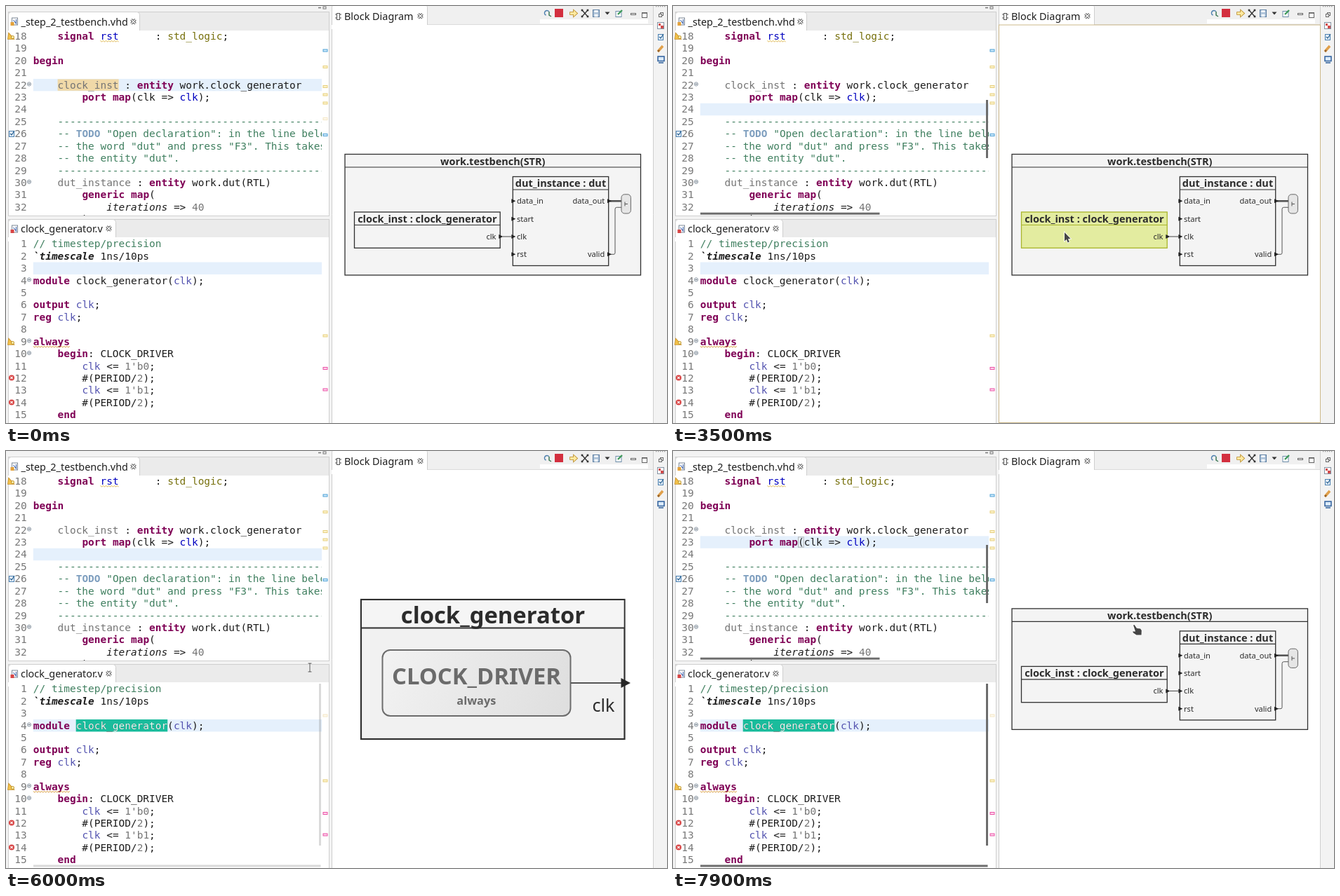
An HTML page with a canvas for the animation above (8000 ms loop, 942 px wide and 595 px high).

```html
<!DOCTYPE html>
<html lang="en">
<head>
<meta charset="utf-8">
<title>Block diagram navigation</title>
<style>
html, body { margin: 0; width: 100%; height: 100%; overflow: hidden; background: #f3f3f3; }
canvas { display: block; }
</style>
</head>
<body>
<canvas id="stage" width="942" height="595"></canvas>
<script>
const g = document.getElementById('stage').getContext('2d');
const LOOP = 8000, STEP = 100;
const MONO = '14.45px "DejaVu Sans Mono", monospace';
const SANS = '"Noto Sans", sans-serif';
const CH = 8.7, ROW = 17.43, LEFT = 38.8;
const TEAL = '#1abc9c', INK = '#2c2c2c';

// {k..} keyword, {c..} comment, {t..} task tag, {g..} muted, {b..} name, {o..} type, {i..} italic, {m..} macro
const STYLES = {
  k: ['#7f0055', 'bold '], c: ['#3f7f5f', ''], t: ['#7f9fbf', 'bold '], g: ['#747474', ''],
  b: ['#0000c0', ''], v: ['#5454b0', ''], o: ['#77700c', ''], i: ['#1c1c1c', 'italic '], m: ['#1c1c1c', 'italic bold ']
};
const RULE = '    {c' + '-'.repeat(52) + '}';
const top1 = {
  first: 18, y: 34.2, clip: [4, 35, 446, 264], folds: [22, 30],
  lines: [
    '    {ksignal} {brst}      : {ostd_logic};', '', '{kbegin}', '',
    '    {gclock_inst} : {kentity} work.clock_generator',
    '        {kport} {kmap}(clk => {bclk});', '',
    RULE,
    '    {c-- }{tTODO}{c "Open declaration": in the line below, click}',
    '    {c-- the word "dut" and press "F3". This takes you to}',
    '    {c-- the entity "dut".}',
    RULE,
    '    {gdut_instance} : {kentity} work.dut(RTL)',
    '        {kgeneric} {kmap}(',
    '            {iiterations} => {g40}',
    '        )'
  ]
};
const low = {
  first: 1, y: 330.7, clip: [4, 330, 446, 265], folds: [4, 9, 10],
  lines: [
    '{c// timestep/precision}', '{m`timescale} 1ns/10ps', '',
    '{kmodule} clock_generator({vclk});', '',
    '{koutput} {vclk};', '{kreg} {vclk};', '',
    '{kalways}', '    {kbegin}: CLOCK_DRIVER',
    '        {vclk} <= {g1\'b0};', '        #(PERIOD/{g2});',
    '        {vclk} <= {g1\'b1};', '        #(PERIOD/{g2});', '    {kend}'
  ]
};

// time, x, y of the pointer
const path = [
  [300, 6, 235], [1100, 292, 126], [1300, 288, 129], [1500, 288, 129], [1600, 284, 130],
  [2200, 110, 113], [2300, 110, 113], [2500, 159, 125], [2900, 159, 125], [3000, 240, 148],
  [3200, 558, 323], [4200, 558, 323], [4500, 588, 333], [5000, 631, 335], [5500, 631, 335],
  [5900, 452, 330], [6800, 281, 141], [7000, 278, 127], [7600, 278, 127], [7900, 656, 248]
];

const clamp = v => Math.max(0, Math.min(1, v));
const ramp = (t, a, b) => clamp((t - a) / (b - a));
const mix = (a, b, p) => a + (b - a) * p;
const col = c => LEFT + c * CH;
const rowY = (ed, n) => ed.y + (n - ed.first) * ROW;

function pointer(t) {
  for (let i = 1; i < path.length; i++) {
    const a = path[i - 1], b = path[i];
    if (t <= b[0]) {
      const p = ramp(t, a[0], b[0]);
      return [mix(a[1], b[1], p), mix(a[2], b[2], p)];
    }
  }
  return path[path.length - 1].slice(1);
}

function rect(x, y, w, h, fill, stroke, lw = 1) {
  if (fill) { g.fillStyle = fill; g.fillRect(x, y, w, h); }
  if (stroke) { g.strokeStyle = stroke; g.lineWidth = lw; g.strokeRect(x, y, w, h); }
}
function rounded(x, y, w, h, r, fill, stroke, lw) {
  g.beginPath(); g.roundRect(x, y, w, h, r);
  g.fillStyle = fill; g.fill();
  g.strokeStyle = stroke; g.lineWidth = lw; g.stroke();
}
function line(pts, color, lw = 1) {
  g.beginPath();
  for (let i = 0; i < pts.length; i += 2) g.lineTo(pts[i], pts[i + 1]);
  g.strokeStyle = color; g.lineWidth = lw; g.stroke();
}
function poly(pts, fill, stroke) {
  g.beginPath();
  for (let i = 0; i < pts.length; i += 2) g.lineTo(pts[i], pts[i + 1]);
  g.closePath();
  if (stroke) { g.strokeStyle = stroke; g.lineWidth = 1.6; g.stroke(); }
  g.fillStyle = fill; g.fill();
}
function disc(x, y, r, fill, stroke) {
  g.beginPath(); g.arc(x, y, r, 0, 7);
  if (fill) { g.fillStyle = fill; g.fill(); }
  if (stroke) { g.strokeStyle = stroke; g.lineWidth = 1; g.stroke(); }
}
function text(s, x, y, font, color, align = 'left') {
  g.font = font; g.fillStyle = color; g.textAlign = align;
  g.fillText(s, x, y);
}
function squiggle(x, y, w, color) {
  const pts = [];
  for (let i = 0; i <= w; i += 2) pts.push(x + i, y + (i / 2 % 2 ? 1 : -0.5));
  line(pts, color, 1);
}

// ---- editors ----
function codeLine(src, y, plain) {
  let c = 0;
  for (const m of src.matchAll(/\{(\w)(.*?)\}|[^{]+/g)) {
    const [color, face] = m[1] ? STYLES[m[1]] : ['#1c1c1c', ''], s = m[1] ? m[2] : m[0];
    text(s, col(c), y + 13.6, face + MONO, plain || color);
    c += s.length;
  }
}
function editor(ed, current, marks, picked) {
  g.save();
  g.beginPath(); g.rect(...ed.clip); g.clip();
  if (current) rect(LEFT, rowY(ed, current), 450 - LEFT, ROW, '#e5f0fc');
  marks.forEach(r => rect(...r, '#f0d9a8'));
  picked.forEach(r => rect(...r, TEAL));
  ed.lines.forEach((s, i) => {
    const n = ed.first + i, y = rowY(ed, n);
    if (n < 33) text(n, 29.7, y + 13.6, MONO, '#787878', 'right');
    codeLine(s, y);
  });
  ed.folds.forEach(n => {
    const y = rowY(ed, n) + 7.5;
    disc(33, y, 2.6, '#f4f6f8', '#8d99a5');
    line([31.5, y, 34.5, y], '#596673');
  });
  if (picked.length) {
    g.beginPath(); picked.forEach(r => g.rect(...r)); g.clip();
    ed.lines.forEach((s, i) => codeLine(s, rowY(ed, ed.first + i), '#f4fffb'));
  }
  g.restore();
}
function warning(x, y) {
  poly([x - 3, y - 4, x + 4, y + 4, x - 4, y + 4], '#f2c14a', '#c48a1c');
  disc(x + 2.5, y + 1.5, 2, '#fff3b0', '#b98d26');
}
function error(x, y) {
  disc(x, y, 4, '#d84545');
  line([x - 1.7, y - 1.7, x + 1.7, y + 1.7], '#fff', 1.2);
  line([x + 1.7, y - 1.7, x - 1.7, y + 1.7], '#fff', 1.2);
}
function task(x, y) {
  rect(x - 3.5, y - 3.5, 7, 8, '#e8f1fa', '#4a7fb0');
  line([x - 2, y, x, y + 2, x + 4, y - 4], '#2f6593', 1.3);
}
function bars(alpha, v0, v1, h1, hy) {
  if (!alpha) return;
  g.globalAlpha = alpha;
  rect(446, v0, 3, v1 - v0, '#6d6d6d');
  rect(39, hy - 1.5, h1 - 39, 3, '#6d6d6d');
  g.globalAlpha = 1;
}
const tick = (y, fill, edge) => rect(452, y - 1.5, 6, 3, fill, edge);

// ---- window frame ----
function closeMark(x, y) {
  for (const [c, w] of [['#555', 3.6], ['#fff', 1.4]]) {
    line([x - 3, y - 3, x + 3, y + 3], c, w);
    line([x + 3, y - 3, x - 3, y + 3], c, w);
  }
}
function tab(x, y, w, h, label, tx, base, cx) {
  g.beginPath(); g.roundRect(x + 0.5, y + 0.5, w, h + 4, [4, 4, 0, 0]);
  g.fillStyle = '#fff'; g.fill();
  g.strokeStyle = '#cfcfcf'; g.lineWidth = 1; g.stroke();
  rect(x, y + h, w + 2, 6, '#fff');
  text(label, tx, base, '14.4px ' + SANS, '#1d1d1d');
  closeMark(cx, base - 5.5);
}
function fileIcon(x, y, color) {
  rect(x - 4, y - 5, 8, 10, '#fff', '#7c8795');
  line([x - 2, y - 2, x + 2, y + 3, x + 2, y - 3], '#4a6db0', 1.2);
  rect(x - 6, y + 1, 5, 5, color);
}
function chrome() {
  rect(0, 0, 942, 595, '#f3f3f3');
  rect(3, 8, 458, 27, '#ebebeb');
  rect(4, 35, 456, 264, '#fff');
  rect(3, 304, 458, 26, '#ebebeb');
  rect(4, 330, 456, 265, '#fff');
  rect(3.5, 8.5, 457, 291, null, '#cfcfcf');
  rect(3.5, 304.5, 457, 300, null, '#cfcfcf');
  rect(464, 0, 459, 27, '#f0f0f0');
  rect(465, 27, 457, 568, '#fff');
  line([464.5, 0, 464.5, 595], '#cfcfcf');
  line([922.5, 0, 922.5, 595], '#cfcfcf');
  line([600, 26.5, 922, 26.5], '#dcdcdc');
  rect(761, 19, 154, 6, '#fff');
  tab(3, 8, 187, 27, '_step_2_testbench.vhd', 21.5, 27.7, 181.5);
  fileIcon(12.5, 22, '#e3a13a');
  tab(3, 304, 153, 26, 'clock_generator.v', 21, 323, 146.5);
  fileIcon(12.5, 318, '#d84545');
  tab(464, -3, 136, 30, 'Block Diagram', 482, 19.8, 590.5);
  rect(471.5, 10.5, 4, 9, '#fff', '#555');
  [12, 17].forEach(y => { line([469, y, 471, y], '#555'); line([476, y, 478, y], '#555'); });
  line([445, 2.5, 449, 2.5], '#777', 1.5);
  rect(452, 1, 4, 3, null, '#777');
  toolbar();
  sidebar();
}
function toolbar() {
  g.beginPath(); g.arc(771, 10, 3.5, 2, 5.6);
  g.strokeStyle = '#4d7fae'; g.lineWidth = 1.5; g.stroke();
  line([774, 8, 774, 13, 777, 15], '#3f7a58', 1.5);
  rect(782, 4, 12, 12, '#d32f3f');
  poly([804, 9, 809, 9, 809, 6, 814, 10.5, 809, 15, 809, 12, 804, 12], '#ffe9a0', '#b98a22');
  line([821, 6, 829, 15], '#333', 1.3); line([829, 6, 821, 15], '#333', 1.3);
  for (const [x, y] of [[821, 6], [829, 6], [821, 15], [829, 15]]) rect(x - 1.3, y - 1.3, 2.6, 2.6, '#333');
  rect(836.5, 5.5, 9, 10, '#a9bfd6', '#5d7fa3');
  rect(838.5, 6, 5, 3, '#fff'); rect(838.5, 11.5, 5, 4, '#eef3f8');
  poly([853.5, 8.5, 860.5, 8.5, 857, 12.5], '#333');
  rect(869, 7.5, 8, 8, '#fff', '#6c8ca8');
  line([872, 12, 878, 6], '#3f9a5c', 2.4);
  rect(890.5, 10.5, 7, 2, '#fff', '#666');
  rect(906.5, 9.5, 7, 7, '#fff', '#666');
  line([906, 10, 914, 10], '#666', 1.6);
}
function sidebar() {
  for (let x = 926; x < 940; x += 3) rect(x, 0, 1.3, 1.3, '#999');
  rect(932.5, 9.5, 4, 4, '#fff', '#666'); rect(930.5, 11.5, 4, 4, '#fff', '#666');
  rect(928.5, 23.5, 9, 9, '#fff', '#8492a2');
  rect(930, 25, 3, 3, '#d14b4b'); rect(933, 28, 4, 4, '#d14b4b');
  task(933, 44);
  line([929, 65, 936, 57], '#e0a04a', 3.5); line([929, 65, 931, 63], '#8a5a2a', 2);
  rect(929, 72, 9, 6.5, '#dcebfa', '#2e5f9c', 1.5);
  line([930, 81, 937, 81], '#2e5f9c', 1.5);
}

// ---- diagrams ----
function block(x, y, w, h, bar, title, base, hot) {
  const edge = hot ? '#a9b52c' : '#303030';
  rect(x, y, w, h, hot ? '#e3eca0' : '#f4f4f4', edge, 1.3);
  line([x, y + bar, x + w, y + bar], edge, 1.2);
  text(title, x + w / 2, base, 'bold 14.5px ' + SANS, INK, 'center');
}
function port(x, y) { poly([x - 3, y - 3, x + 3, y, x - 3, y + 3], '#222'); }
function testbench(dy, hot) {
  const label = (s, x, y, a) => text(s, x, y + 4, '11.1px ' + SANS, INK, a);
  g.save(); g.translate(0, dy);
  block(483, 211.5, 421.5, 172.5, 18.5, 'work.testbench(STR)', 226.7);
  block(496.5, 294, 207.7, 51.3, 18.5, 'clock_inst : clock_generator', 308.6, hot);
  block(722.3, 243.5, 136.4, 127, 18.5, 'dut_instance : dut', 258.2);
  line([708, 329, 720, 329], '#444');
  line([861, 278.3, 877, 278.3], '#555', 2.6);
  g.beginPath(); g.moveTo(861, 354.3); g.lineTo(866, 354.3); g.arcTo(868, 354.3, 868, 352, 2);
  g.lineTo(868, 290); g.arcTo(868, 287.3, 871, 287.3, 2.5); g.lineTo(877, 287.3);
  g.strokeStyle = '#555'; g.lineWidth = 1; g.stroke();
  ['data_in', 'start', 'clk', 'rst'].forEach((s, i) => {
    const y = 278.3 + i * 25.35;
    port(723.3, y); label(s, 728, y);
  });
  label('data_out', 853.3, 278.3, 'right'); port(860, 278.3);
  label('valid', 853.3, 354.3, 'right'); port(860, 354.3);
  label('clk', 698.5, 329, 'right'); port(705.3, 329);
  rounded(877, 268.8, 13.4, 27.2, 4.5, '#e6e6e6', '#666', 1);
  line([882, 279.5, 882, 285.5], '#555'); line([882, 282.5, 886, 282.5], '#555');
  g.restore();
}
// p: 0 = initial small view, 1 = zoomed to fit
function clockModule(p) {
  const k = mix(1 / 2.83, 1, p);
  g.save();
  g.translate(mix(473.5, 506, p), mix(36, 212, p));
  g.scale(k, k);
  g.translate(-506, -212);
  const lw = mix(3, 2.2, p);
  rect(506, 212, 375.5, 199, '#f1f1f1', '#303030', lw);
  rect(507, 213, 373.5, 39, '#f5f5f5');
  line([506, 252.5, 881.5, 252.5], '#303030', lw * 0.9);
  text('clock_generator', 694, 245.5, 'bold 32.8px ' + SANS, INK, 'center');
  const shade = g.createLinearGradient(536, 284, 805, 378);
  shade.addColorStop(0, '#f2f2f2'); shade.addColorStop(1, '#dedede');
  rounded(536.5, 284, 268, 94, 11, shade, '#6c6c6c', lw * 0.9);
  text('CLOCK_DRIVER', 670.5, 333, 'bold 32.8px ' + SANS, '#6b6b6b', 'center');
  text('always', 670.3, 361.5, 'bold 16.3px ' + SANS, '#6b6b6b', 'center');
  line([805, 331, 878, 331], '#555', lw * 0.8);
  poly([876.5, 324, 890, 331, 876.5, 338], '#262626');
  text('clk', 835.5, 372, '25.2px ' + SANS, INK);
  g.restore();
}

// ---- pointer shapes ----
function ibeam(x, y) {
  const pts = [[-2.5, -6, 2.5, -6], [0, -6, 0, 6], [-2.5, 6, 2.5, 6]];
  for (const [c, w] of [['rgba(255,255,255,.8)', 2.6], ['#4a4a4a', 1]])
    pts.forEach(p => line(p.map((v, i) => v + (i % 2 ? y : x)), c, w));
}
function shape(x, y, pts) {
  poly(pts.map((v, i) => v + (i % 2 ? y : x)), '#454545', '#fff');
}
const ARROW = [0, 0, 0, 12.5, 2.8, 10, 4.6, 14.5, 6.8, 13.5, 5, 9.3, 8.6, 9];
const HAND = [0, 0.5, 1.5, 0, 5, 5, 10, 5.5, 11.8, 8, 11.5, 14.5, 4.5, 14.5, 0, 11.5, -1, 9.5, 3, 9.5];

function draw(t) {
  const [mx, my] = pointer(t);
  chrome();

  // upper editor
  const dragging = t >= 1700 && t < 3000;
  const caret = t < 2200 ? Math.max(8, Math.min(29, Math.round((mx - LEFT) / CH))) : 8;
  const up = dragging && my < 121.4 || t >= 2200 && t < 3000;
  const y22 = rowY(top1, 22), y23 = rowY(top1, 23);
  const picked = !dragging ? [] : up
    ? [[col(caret), y22, 450 - col(caret), ROW], [LEFT, y23, col(29) - LEFT, ROW]]
    : [[col(caret), y23, col(29) - col(caret), ROW]];
  const current = t < 1600 ? 22 : up ? 0 : t < 3000 ? 23 : t < 7300 ? 24 : 23;
  editor(top1, current, t < 3000 ? [[col(4), y22 + 0.5, CH * 10, ROW - 1]] : [], picked);
  squiggle(col(11), 50, 26, '#e0b64a');
  if (t >= 1600 && t < 3000) {
    if (dragging) rect(col(caret) - 0.5, up ? y22 : y23, 1.5, ROW, '#e5433f');
    else rect(col(29) - 0.3, y23 + 0.5, 1.5, ROW - 1, '#000');
  }
  if (t >= 7300) rect(col(16) + 0.5, y23 + 1.5, CH - 1, ROW - 3, null, '#b5b5b5');
  warning(7, 43);
  task(8, 182);

  // lower editor
  const opened = t >= 5200, y4 = rowY(low, 4);
  editor(low, opened ? 4 : 3, [], opened ? [[col(7), y4, CH * 15, ROW]] : []);
  if (opened && t < 6000) rect(col(22), y4, 1.5, ROW, '#000');
  squiggle(col(0), 486, 52, '#d99a3a');
  warning(7, 479);
  error(8, 530.5);
  error(8, 565.5);

  // overview rulers
  [63.5, 184].forEach(y => tick(y, '#d4ecfb', '#4b9fd6'));
  [87, 115, 126.5, 138.5, 470.5].forEach(y => tick(y, '#fdf3cd', '#e6cf7c'));
  [517, 547.5].forEach(y => tick(y, '#ffd9ee', '#ea4fa5'));
  if (t < 3000) tick(161, '#fffaf0', '#f3e6c4');
  if (t >= 6000) tick(377.5, '#fffaf0', '#f3e6c4');
  bars(t < 4000 ? ramp(t, 200, 600) : t < 6500 ? 1 - ramp(t, 4500, 5000) : ramp(t, 6800, 7000),
    134, 217, 294.5, 296.2);
  bars(ramp(t, 5900, 6300), 332, 563, 448.5, 592);

  // diagram view
  if (t < 5500) testbench(0, t >= 3400);
  else if (t < 7300) {
    const p = ramp(t, 5500, 5900);
    clockModule(p * p * (3 - 2 * p));
  } else testbench(13.4, false);
  if (t >= 3400 && t < 5100) rect(464.5, 27, 458, 567.5, null, '#cdb98a');
  if (t >= 4200 && t < 5100) {
    rect(559, 323, 244, 27, TEAL);
    text('Open Module clock_generator', 580, 342, '14.4px ' + SANS, '#f4fffb');
  }

  if (t < 300) return;
  if (mx > 38 && mx < 450) ibeam(mx, my);
  else if (t >= 7700) shape(mx, my, HAND);
  else shape(mx, my, ARROW);
}

const start = performance.now();
function tickFrame(now) {
  const t = Math.max(0, now - start) % LOOP;
  draw(Math.floor(t / STEP) * STEP);
  requestAnimationFrame(tickFrame);
}
requestAnimationFrame(tickFrame);
</script>
</body>
</html>
```
